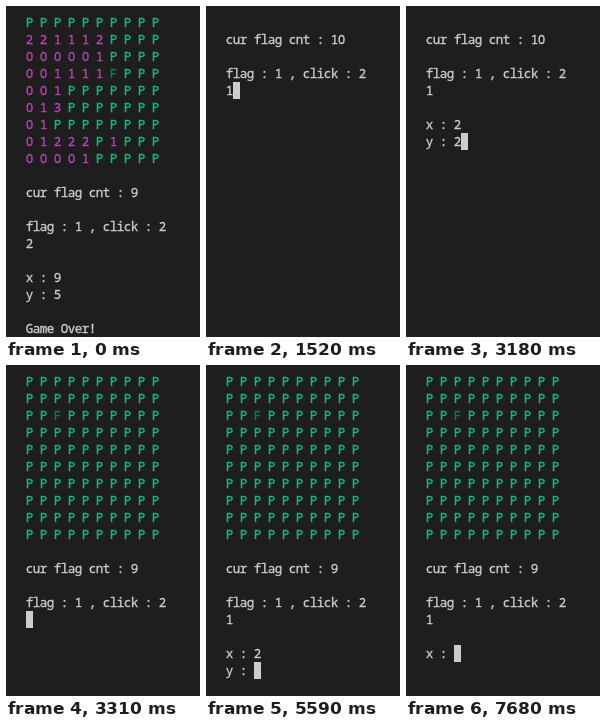
These frames come from a looping animation (194x331 px, 8000 ms). An HTML page with a canvas:

```html
<!DOCTYPE html>
<html lang="en">
<head>
<meta charset="utf-8">
<title>Minesweeper in a terminal</title>
<style>
  html, body { margin: 0; width: 100%; height: 100%; overflow: hidden; background: #1e1e1e; }
  canvas { display: block; }
</style>
</head>
<body>
<canvas id="screen" width="194" height="331"></canvas>
<script>
const ctx = document.getElementById('screen').getContext('2d');
const LOOP = 8000, LEFT = 20, TOP = 8, CELL = 7, LINE = 17;
const BG = '#1e1e1e', TEXT = '#cccccc', GREEN = '#0dbc79', MAGENTA = '#bc3fbc';
const DIM = '#14774f', BLUE = '#2472c8';

const hidden = 'PPPPPPPPPP';
const lostBoard = [
  hidden, '221112PPPP', '000001PPPP', '001111FPPP', '001PPPPPPP',
  '013PPPPPPP', '01PPPPPPPP', '01222P1PPP', '00001PPPPP'
];
const newBoard = Array(10).fill(hidden);
newBoard[2] = 'PPFPPPPPPP';

const menu = count => ['', 'cur flag cnt : ' + count, '', 'flag : 1 , click : 2'];
const lostText = [...menu(9), '2', '', 'x : 9', 'y : 5', '', 'Game Over!'];
const prompt = [['dwl@DESKTOP-GJ26TDM', '#23d18b'], [':', TEXT], ['~/zrain', '#3b8eea']];

// The cursor follows the last typed line.
const start = (...typed) => ({ board: [], text: [...menu(10), ...typed], cursor: true });
const play = (...typed) => ({ board: newBoard, text: [...menu(9), ...typed], cursor: true, flag: DIM });

const steps = [
  [0, { board: lostBoard, text: lostText, flag: DIM }],
  [500, { board: lostBoard.slice(1), text: lostText, flag: BLUE, prompt }],
  [560, start('')],
  [1520, start('1')],
  [1720, start('1', '', 'x : ')],
  [1920, start('1', '', 'x : 2')],
  [2050, start('1', '', 'x : 2', 'y : ')],
  [3180, start('1', '', 'x : 2', 'y : 2')],
  [3310, play('')],
  [4640, play('1')],
  [4770, play('1', '', 'x : ')],
  [5520, play('1', '', 'x : 2')],
  [5580, play('1', '', 'x : 2', 'y : ')],
  [5650, play('1', '', 'x : 2', 'y : 2')],
  [5920, play('1', '', 'x : 2', 'y : 22')],
  [6050, play('1', '', 'x : 2', 'y : 22', '')],
  [6120, play('')],
  [7540, play('1')],
  [7610, play('1', '')],
  [7680, play('1', '', 'x : ')]
];

function write(text, col, row, color, bold) {
  ctx.fillStyle = ctx.strokeStyle = color;
  ctx.lineWidth = 0.35;
  [...text].forEach((ch, i) => {
    // Noto Sans has a zero without a slash.
    const family = ch === '0' ? '"Noto Sans", sans-serif' : '"Noto Sans Mono", monospace';
    ctx.font = `${bold ? 'bold' : 'normal'} 12.5px ${family}`;
    const at = [ch, LEFT + (col + i + 0.5) * CELL, TOP + row * LINE + 13];
    ctx.fillText(...at);
    if (!bold) ctx.strokeText(...at);
  });
}

function draw(s) {
  ctx.fillStyle = BG;
  ctx.fillRect(0, 0, 194, 331);
  ctx.textAlign = 'center';
  s.board.forEach((line, row) => [...line].forEach((ch, i) =>
    write(ch, i * 2, row, ch === 'P' ? GREEN : ch === 'F' ? s.flag : MAGENTA)));
  s.text.forEach((line, i) => write(line, 0, s.board.length + i, TEXT));

  const end = s.board.length + s.text.length;
  if (s.cursor) {
    ctx.fillStyle = TEXT;
    ctx.fillRect(LEFT + s.text.at(-1).length * CELL, TOP + (end - 1) * LINE, CELL, LINE);
  }
  let col = 0;
  for (const [text, color] of s.prompt || []) {
    write(text, col, end, color, color !== TEXT);
    col += text.length;
  }
}

function tick() {
  const t = performance.now() % LOOP;
  draw(steps.findLast(([at]) => at <= t)[1]);
  requestAnimationFrame(tick);
}
tick();
</script>
</body>
</html>
```
